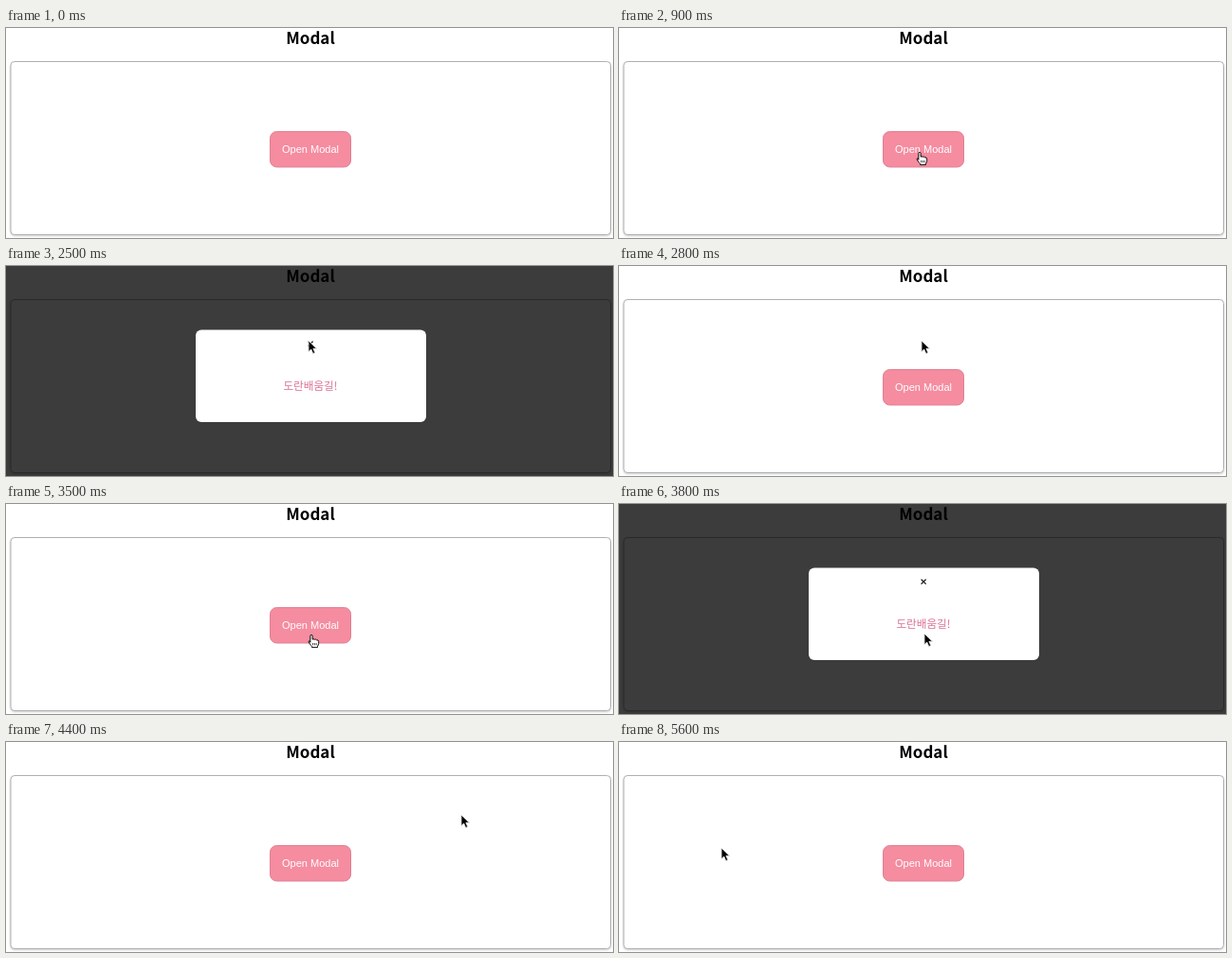
Write an HTML page that moves like this. It is 640x222 px and loops after 5.96 s.

```html
<!DOCTYPE html>
<html lang="ko">
<head>
<meta charset="utf-8">
<title>Modal</title>
<style>
  html, body { margin: 0; width: 640px; height: 222px; overflow: hidden; background: #fff; }
  svg { display: block; }
  text { text-anchor: middle; }
  .title { font: 700 17px "Noto Sans CJK KR", "Noto Sans CJK", "Noto Sans", sans-serif; }
  .label { font: 11px "Liberation Sans", Arial, sans-serif; fill: #fff; }
  .message { font: 350 11.6px "Noto Sans CJK KR", "Noto Sans CJK", "Noto Sans", sans-serif; fill: #db7093; }
  .panel { fill: #fff; stroke: #b0b0b0; filter: drop-shadow(0 1px 1px rgba(0, 0, 0, .2)); }
  .cursor { filter: drop-shadow(0 .6px .6px rgba(0, 0, 0, .3)); }
</style>
</head>
<body>
<svg width="640" height="222" viewBox="0 0 640 222">
  <rect width="640" height="222" fill="#fff"/>
  <text class="title" x="321" y="17">Modal</text>
  <rect class="panel" x="5" y="35.5" width="632.5" height="183" rx="4"/>
  <rect x="278.5" y="109.5" width="85" height="37.5" rx="7" fill="#f58ca0" stroke="#e07f93"/>
  <text class="label" x="321" y="132">Open Modal</text>

  <g id="modal">
    <rect width="640" height="222" fill="#000" fill-opacity=".765"/>
    <rect x="200" y="67.5" width="243" height="97.5" rx="6" fill="#fff"/>
    <path d="M318.6 79.6l5 5m0-5l-5 5" stroke="#000" stroke-width="1.2"/>
    <text class="message" x="321" y="131">도란배움길!</text>
  </g>

  <g id="pointer">
    <path id="arrow" class="cursor" d="M0 0V11.6L2.7 9.1L4.7 13.6L6.8 12.7L4.9 8.3H8.5Z"
      fill="#000" stroke="#fff" stroke-width=".8"/>
    <g id="hand" class="cursor" stroke="#000" stroke-width=".9" stroke-linejoin="round">
      <path d="M-1.1 8.3V1.5Q-1.1 .4 0 .4T1.1 1.5V5.2Q2 4.2 3.2 5.3Q4.4 4.5 5.4 5.8Q7.5 5.4 7.6 7.3V9.5Q7.4 11.2 6.5 12.2V13.6H.6V12.4Q-.8 11.4-1.6 9.9L-2.8 8Q-3.2 6.9-2.2 6.8Q-1.7 6.8-1.1 8.3Z" fill="#fff"/>
      <path d="M1.6 9V11.3M3.4 9V11.3M5.2 9V11.3" fill="none" stroke-width=".7"/>
    </g>
    <path id="beam" d="M-2.6-5.4Q0-5.4 0-4Q0-5.4 2.6-5.4M0-4V4.6M-2.6 6Q0 6 0 4.6Q0 6 2.6 6M-1.5 2H1.5"
      fill="none" stroke="#000" stroke-width="1.1"/>
  </g>
</svg>
<script>
const LOOP = 5960, STEP = 100;
const $ = id => document.getElementById(id);
const shapes = ["arrow", "hand", "beam"];
const linear = p => p;
const easeOut = p => 1 - (1 - p) ** 2;
const easeInOut = p => p * p * (3 - 2 * p);

// Each leg: first step, last step, cursor, end x, end y, easing.
const legs = [
  [200, 200, "arrow", 97, 200],
  [300, 600, "arrow", 300, 151, easeOut],
  [700, 700, "hand", 308, 143],
  [800, 900, "hand", 317, 131],
  [1300, 1300, "beam", 317, 131],
  [1700, 1700, "arrow", 319, 110],
  [1900, 2000, "arrow", 327, 98],
  [2100, 2200, "arrow", 322, 83],
  [2300, 2300, "hand", 319, 79],
  [2500, 2500, "arrow", 319, 79],
  [3000, 3100, "arrow", 326, 79, easeOut],
  [3300, 3300, "arrow", 327, 94],
  [3400, 3500, "hand", 322, 138, easeOut],
  [3800, 3800, "arrow", 322, 137],
  [4000, 4300, "arrow", 480, 77, easeInOut],
  [4800, 5300, "arrow", 167, 106, easeInOut],
  [5400, 5600, "arrow", 108, 112, easeOut]
];

function pointerAt(t) {
  let x = 0, y = 0, kind = null;
  for (const [start, end, shape, toX, toY, ease = linear] of legs) {
    if (t < start) break;
    const count = (end - start) / STEP + 1;
    const done = Math.min(count, Math.floor((t - start) / STEP) + 1);
    const p = ease(done / count);
    x += (toX - x) * p;
    y += (toY - y) * p;
    kind = shape;
  }
  return { x, y, kind };
}

function show(el, on) {
  el.style.display = on ? "" : "none";
}

function render(now) {
  const t = now % LOOP;
  const { x, y, kind } = pointerAt(t);
  show($("modal"), (t >= 1300 && t < 2800) || (t >= 3800 && t < 4400));
  $("pointer").setAttribute("transform", `translate(${x.toFixed(1)} ${y.toFixed(1)})`);
  for (const id of shapes) show($(id), id === kind);
}

const begin = performance.now();
function tick() {
  render(performance.now() - begin);
  requestAnimationFrame(tick);
}
tick();
</script>
</body>
</html>
```
